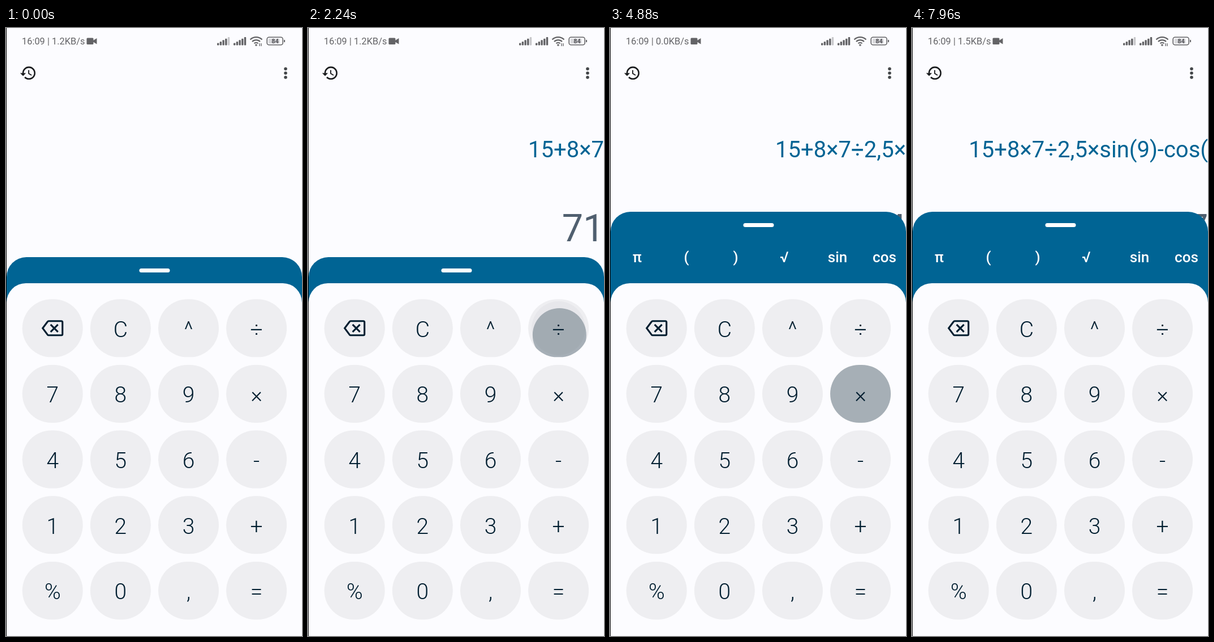
An HTML page that plays this animation: 523 px wide and 1072 px high, repeating every 8000 ms.

```html
<!DOCTYPE html>
<html lang="en">
<head>
<meta charset="utf-8">
<title>Calculator</title>
<style>
  html, body { margin: 0; width: 100%; height: 100%; overflow: hidden; background: #fcfcff; }
  svg { display: block; width: 100%; height: 100%; font-family: Roboto, sans-serif; }
  .status { font-size: 16.4px; fill: #636366; }
  .expr { font-size: 40px; fill: #006494; text-anchor: end; }
  .result { font-size: 66.5px; fill: #505f6f; text-anchor: end; }
  .func { font-size: 26px; font-weight: 500; fill: #fff; text-anchor: middle; }
  .key { font-size: 39px; font-weight: 300; fill: #001e30; text-anchor: middle; }
  .ripple { fill: #001e30; }
</style>
</head>
<body>
<svg id="stage" viewBox="0 0 523 1072" preserveAspectRatio="none">
  <defs>
    <clipPath id="keyShape"><rect x="-53.5" y="-51" width="107" height="102" rx="51"/></clipPath>
  </defs>
  <rect width="523" height="1072" fill="#fcfcff"/>

  <text id="status" class="status" x="28" y="29"></text>
  <g fill="#636366">
    <rect x="142.500" y="17.500" width="12" height="11.500" rx="1.500"/>
    <path d="M154 22l6.500-4v10.500l-6.500-4z"/>
  </g>
  <g id="signals" fill="#636366"></g>
  <g fill="none" stroke="#636366" stroke-width="2.300">
    <path d="M431.500 20.500a15 15 0 0 1 21 0M435 24a10 10 0 0 1 14 0M438.500 27.300a5 5 0 0 1 7 0"/>
    <circle cx="442" cy="30" r=".7"/>
    <path id="traffic" d="M448 27v5M451 27v5" stroke-width="1.300"/>
    <rect x="461.200" y="16.200" width="28" height="13.600" rx="3.500" stroke-width="1.600"/>
    <path d="M492 21v4" stroke-width="2"/>
  </g>
  <rect x="463.500" y="18.500" width="20" height="9" rx="1.500" fill="#d9d9dc"/>
  <text x="475.500" y="27" font-size="11" font-weight="700" fill="#55555a" text-anchor="middle">84</text>

  <path transform="translate(23.700 64) scale(1.290)" fill="#1a1c1e" d="M13 3a9 9 0 0 0-9 9H1l3.890 3.890.070.140L9 12H6c0-3.870 3.130-7 7-7s7 3.130 7 7-3.130 7-7 7c-1.930 0-3.680-.790-4.940-2.060l-1.420 1.420A8.954 8.954 0 0 0 13 21a9 9 0 0 0 0-18zm-1 5v5l4.280 2.540.720-1.210-3.500-2.080V8z"/>
  <g fill="#44474a">
    <circle cx="494" cy="72" r="2.800"/><circle cx="494" cy="79.500" r="2.800"/><circle cx="494" cy="87" r="2.800"/>
  </g>

  <text id="expr" class="expr" x="523" y="228"></text>
  <text id="result" class="result" x="523.500" y="376"></text>

  <g id="panel">
    <rect x="1" y="404" width="522" height="300" rx="35" fill="#006494"/>
    <rect x="235.500" y="424" width="54" height="7" rx="3.500" fill="#fff"/>
    <g id="funcs"></g>
  </g>
  <path d="M1 1072V484a34 34 0 0 1 34-34H489a34 34 0 0 1 34 34V1072z" fill="#fcfcff"/>
  <g id="keys"></g>
  <rect width="1" height="1072" fill="#000"/>
</svg>
<script>
const LOOP = 8000, ENTER = 225, FADE_IN = 75, FADE_OUT = 150, CLICK = 120;
const byId = id => document.getElementById(id);
const clamp = v => Math.min(1, Math.max(0, v));
const smooth = v => { v = clamp(v); return v * v * (3 - 2 * v); };

function add(parent, tag, attrs, text) {
  const el = document.createElementNS('http://www.w3.org/2000/svg', tag);
  for (const name in attrs) el.setAttribute(name, attrs[name]);
  if (text) el.textContent = text;
  return parent.appendChild(el);
}
function setText(id, text) {
  const el = byId(id);
  if (el.textContent !== text) el.textContent = text;
}

// touch time, key, appended text, result
const presses = [
  [50, '1', '1', '1'],
  [270, '5', '5', '15'],
  [500, '+', '+', '15'],
  [880, '8', '8', '23'],
  [1150, '×', '×', '23'],
  [1470, '7', '7', '71'],
  [2140, '÷', '÷', '71'],
  [2740, '2', '2', '43'],
  [3180, ',', ',', '43'],
  [3570, '5', '5', '37,4'],
  [4700, '×', '×', '37,4'],
  [5070, 'sin', 'sin(', '37,4'],
  [5455, '9', '9', '18,504132017'],
  [6200, ')', ')', '18,504132017'],
  [6850, '-', '-', '18,504132017'],
  [7560, 'cos', 'cos(', '18,504132017']
];

// status icons
[373, 402].forEach((left, n) => {
  for (let i = 0; i < 5; i++) {
    const h = 4 + i * 2.6;
    add(byId('signals'), 'rect', {
      x: left + i * 4.7, y: 30.5 - h, width: 3.4, height: h, rx: 1,
      opacity: n === 0 && i === 4 ? 0.35 : 1
    });
  }
});

// function row
[['π', 48], ['(', 135], [')', 222], ['√', 308], ['sin', 402], ['cos', 485]]
  .forEach(([label, x]) => add(byId('funcs'), 'text', { class: 'func', x, y: 493 }, label));

// keypad
const ripples = {};
[...'⌫C^÷789×456-123+%0,='].forEach((label, i) => {
  const x = 82.3 + (i % 4) * 120.1, y = 529.3 + Math.floor(i / 4) * 115.65;
  const key = add(byId('keys'), 'g', { transform: `translate(${x} ${y})` });
  add(key, 'rect', { x: -53.5, y: -51, width: 107, height: 102, rx: 51, fill: '#eeeef1' });
  const clip = add(key, 'g', { 'clip-path': 'url(#keyShape)' });
  ripples[label] = {
    halo: add(clip, 'circle', { class: 'ripple', opacity: 0 }),
    wave: add(clip, 'circle', { class: 'ripple', opacity: 0 })
  };
  if (label === '⌫') {
    add(key, 'path', {
      d: 'M-7-12.500H15.500q2 0 2 2V10.500q0 2-2 2H-7q-1.200 0-2-1.200L-17.500 0L-9-11.300q.800-1.200 2-1.200zM-3.500-6.500L9.500 6.500M9.500-6.500L-3.500 6.500',
      fill: 'none', stroke: '#001e30', 'stroke-width': 3.1
    });
  } else {
    add(key, 'text', { class: 'key', y: 15.5 }, label);
  }
});

function drawRipple({ halo, wave }, age) {
  const grow = smooth(age / ENTER);
  const fade = 1 - clamp((age - ENTER) / FADE_OUT);
  const alpha = age < 0 ? 0 : clamp(age / FADE_IN) * fade;
  const r = 28 + 46 * grow;
  halo.setAttribute('r', r);
  halo.setAttribute('opacity', 0.05 * alpha * (1 - grow));
  wave.setAttribute('r', r);
  wave.setAttribute('cx', 3 * (1 - grow));
  wave.setAttribute('cy', 21 * (1 - grow));
  wave.setAttribute('opacity', 0.3 * alpha);
}

function draw(t) {
  const done = presses.filter(([at]) => t >= at + CLICK);
  setText('expr', done.map(p => p[2]).join(''));
  setText('result', done.length ? done[done.length - 1][3] : '');

  const speed = t < 2800 ? '1.2' : t < 5480 ? '0.0' : '1.5';
  setText('status', `16:09 | ${speed}KB/s`);
  byId('traffic').setAttribute('opacity', speed === '0.0' ? 0 : 1);

  for (const label in ripples) {
    const last = presses.filter(([at, key]) => key === label && at <= t).pop();
    drawRipple(ripples[label], last ? t - last[0] : -1);
  }
  byId('panel').setAttribute('transform', `translate(0 ${-80 * smooth((t - 4160) / 320)})`);
}

const start = performance.now();
function frame() {
  draw((performance.now() - start) % LOOP);
  requestAnimationFrame(frame);
}
draw(0);
requestAnimationFrame(frame);
</script>
</body>
</html>
```
